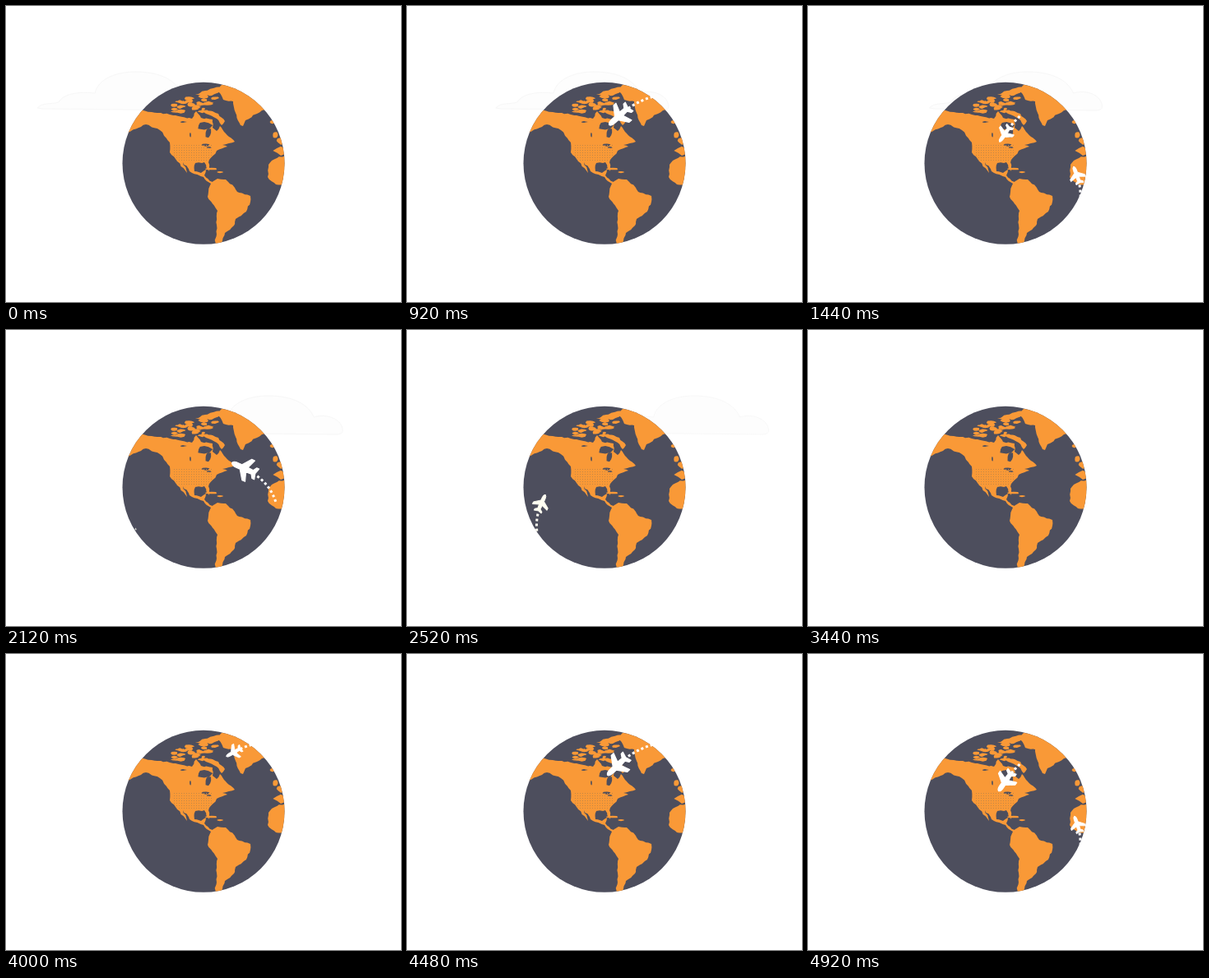
Animation, 480 px wide and 360 px high, one loop 5 s. Source, as an HTML page with a canvas:

```html
<!DOCTYPE html>
<html lang="en">
<head>
<meta charset="utf-8">
<title>Flights around the globe</title>
<style>
  html, body { margin: 0; height: 100%; overflow: hidden; background: #fff; }
  canvas { display: block; }
</style>
</head>
<body>
<canvas id="stage" width="480" height="360"></canvas>
<script>
const ctx = document.getElementById('stage').getContext('2d');
const LOOP = 5000, CYCLE = 3500;
const SEA = '#4d4e5d', LAND = '#f99937';
const land = new Path2D(), water = new Path2D();

let seed = 7;
function random() {
  seed = (seed * 16807) % 2147483647;
  return seed / 2147483647;
}
const spread = size => (random() - 0.5) * size;

// Closed outline through "x,y" corners with a ragged coast between them.
function coast(target, corners) {
  const points = corners.split(' ').map(pair => pair.split(',').map(Number));
  points.forEach(([x, y], i) => {
    const [nextX, nextY] = points[(i + 1) % points.length];
    const steps = Math.ceil(Math.hypot(nextX - x, nextY - y) / 4);
    if (i) target.lineTo(x, y); else target.moveTo(x, y);
    for (let k = 1; k < steps; k++) {
      const u = k / steps;
      target.lineTo(x + (nextX - x) * u + spread(1.8), y + (nextY - y) * u + spread(1.8));
    }
  });
  target.closePath();
}

function blob(target, x, y, rx, ry) {
  for (let k = 0; k < 8; k++) {
    const angle = k * Math.PI / 4, r = 0.75 + random() * 0.5;
    const px = x + Math.cos(angle) * rx * r, py = y + Math.sin(angle) * ry * r;
    if (k) target.lineTo(px, py); else target.moveTo(px, py);
  }
  target.closePath();
}

function buildNorthAmerica() {
  coast(land, '158,126 184,130 206,133 226,137 231,128 237,136 251,138 251,148 256,152 260,146 265,153 271,159 278,165 263,169 269,171 256,176 246,190 247,201 241,190 230,191 229,201 237,203 243,199 241,206 251,214 249,216 240,208 226,203 215,190 220,203 206,186 199,178 199,166 187,151 170,144 148,154');
  blob(water, 241, 145, 9, 5);
  blob(water, 246, 154, 4, 6);
  blob(water, 243, 169, 5, 1.5);
  blob(water, 247, 172, 3, 1);
  blob(water, 224, 157, 1, 3);
  blob(water, 215, 141, 4, 1);
}

function buildArctic() {
  for (let k = 0; k < 30; k++) {
    const x = 201 + random() * 49;
    const top = 117 - (x - 200) * 0.23;
    blob(land, x, top + random() * (129 - top), 2 + random() * 4, 1 + random() * 1.8);
  }
  coast(land, '230,108 242,103 270,96 264,102 250,109');
  coast(land, '237,126 251,128 258,131 266,140 262,145 256,137 243,131');
  blob(land, 254, 112, 5, 2);
}

function buildSouthAmerica() {
  coast(land, '249,216 257,210 267,211 278,221 281,226 297,231 297,238 292,250 279,259 277,267 266,276 260,292 254,292 256,266 257,249 245,232 246,226');
  blob(land, 250, 198, 7, 1.5);
  blob(land, 260, 202, 4, 1.2);
}

function buildEast() {
  coast(land, '262,96 290,96 325,122 311,127 291,139 288,146 285,145 279,130 276,116 264,114 258,104');
  coast(land, '323,188 342,180 342,219 328,217 318,208 319,193');
  blob(land, 334, 176, 8, 5);
  blob(land, 327, 157, 3, 4);
  blob(land, 334, 164, 6, 4);
  blob(land, 324, 141, 3, 2.5);
}

const cloud = new Path2D('M38 124C44 117 54 120 64 117C70 106 90 104 108 106C112 88 135 80 157 80C190 80 207 92 213 106C228 101 247 108 248 122Q248 127 240 127L44 125Z');

function buildPlane() {
  const half = 'M17 0Q16 -3 10 -3L5 -3-3 -14-7 -14-3 -3-10 -2.5-13 -7-16 -7-14 0Z';
  const shape = new Path2D(half);
  shape.addPath(new Path2D(half), new DOMMatrix().scale(1, -1));
  return shape;
}

function flight(d, start, duration, color) {
  const path = document.createElementNS('http://www.w3.org/2000/svg', 'path');
  path.setAttribute('d', d);
  return { path, length: path.getTotalLength(), start, duration, color };
}

const flights = [
  flight('M300 110Q262 120 237 159', 60, 1460, '#fff'),
  flight('M331 240Q335 180 272 162', 1005, 1360, '#fff'),
  flight('M158 246Q152 198 214 160', 2070, 1370, '#fffef2')
];

// Run draw() with the origin on the route, x axis along the heading.
function along(route, distance, draw) {
  const a = route.path.getPointAtLength(distance - 0.5);
  const b = route.path.getPointAtLength(distance + 0.5);
  ctx.save();
  ctx.translate((a.x + b.x) / 2, (a.y + b.y) / 2);
  ctx.rotate(Math.atan2(b.y - a.y, b.x - a.x));
  draw();
  ctx.restore();
}

function drawFlight(route, time) {
  const s = (time - route.start) / route.duration;
  if (s <= 0 || s >= 1) return;
  const scale = Math.min(1, s * 2.1, (1 - s) * 13);
  const head = s * route.length;
  const trailStart = Math.max(0, s - 0.7) * 2.5 * route.length;
  ctx.fillStyle = ctx.strokeStyle = route.color;
  for (let d = 3; d < head - 15 * scale; d += 6) {
    if (d >= trailStart) along(route, d, () => ctx.fillRect(-1.5, -1.5, 3, 3));
  }
  along(route, head, () => {
    ctx.scale(scale, scale);
    ctx.lineWidth = 1.2;
    ctx.lineJoin = 'round';
    ctx.fill(plane);
    ctx.stroke(plane);
  });
}

function drawCloud(time) {
  if (time > 3440) return;
  ctx.save();
  ctx.globalAlpha = Math.min(1, Math.max(0, (3300 - time) / 1000));
  ctx.translate(time * 0.076, 0);
  ctx.fillStyle = '#fdfdfd';
  ctx.strokeStyle = '#f7f7f7';
  ctx.fill(cloud);
  ctx.stroke(cloud);
  ctx.restore();
}

function drawGlobe() {
  ctx.save();
  ctx.beginPath();
  ctx.arc(240, 191.3, 98.5, 0, Math.PI * 2);
  ctx.fillStyle = SEA;
  ctx.fill();
  ctx.clip();
  ctx.fillStyle = LAND;
  ctx.fill(land);
  ctx.fillStyle = SEA;
  ctx.fill(water);
  // Dotted shading over the middle of North America
  ctx.clip(land);
  ctx.fillStyle = '#c58745';
  for (let y = 169; y < 188; y += 3) {
    for (let x = 204; x < 252; x += 3) ctx.fillRect(x, y, 1, 1);
  }
  ctx.restore();
}

function frame() {
  const time = performance.now() % LOOP;
  ctx.fillStyle = '#fff';
  ctx.fillRect(0, 0, 480, 360);
  drawCloud(time);
  drawGlobe();
  flights.forEach(route => drawFlight(route, time % CYCLE));
  requestAnimationFrame(frame);
}

const plane = buildPlane();
buildNorthAmerica();
buildArctic();
buildSouthAmerica();
buildEast();
frame();
</script>
</body>
</html>
```
